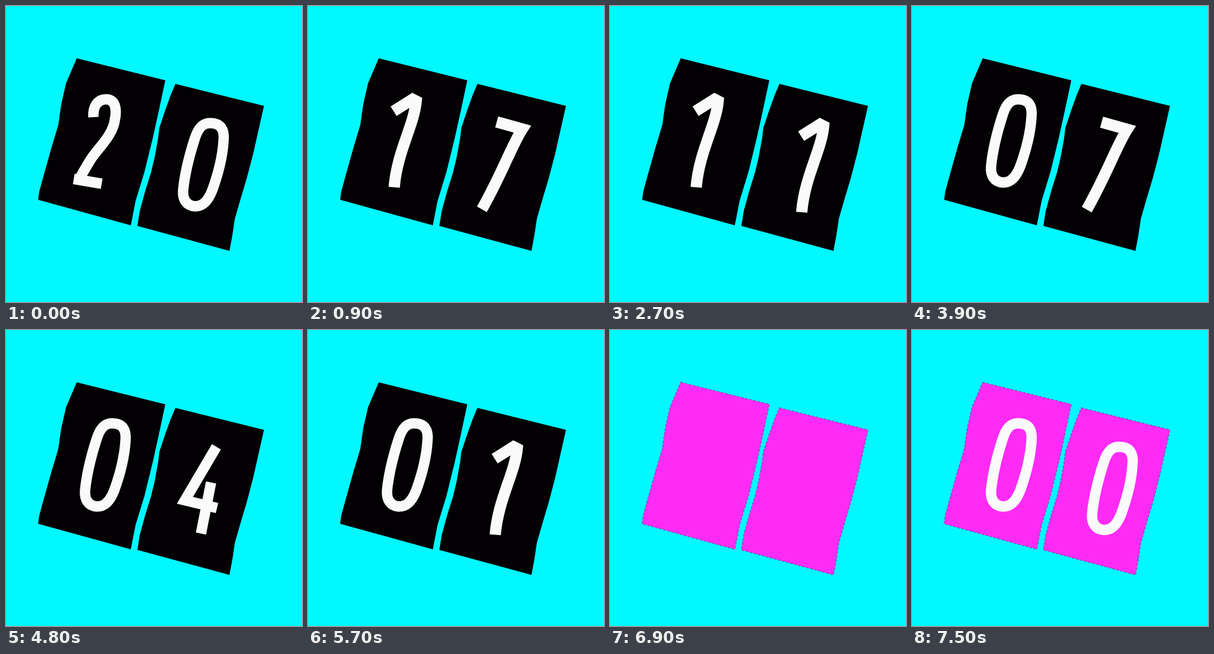
These frames come from a looping animation (498 px wide and 498 px high, 7800 ms). An HTML page with a canvas:

```html
<!DOCTYPE html>
<html lang="en">
<head>
<meta charset="utf-8">
<title>Countdown</title>
<style>
  html, body { margin: 0; width: 100%; height: 100%; overflow: hidden; background: #00f8ff; }
  canvas { display: block; }
</style>
</head>
<body>
<canvas id="stage" width="498" height="498"></canvas>
<script>
const ctx = document.getElementById('stage').getContext('2d');

const STEP = 300;
const LOOP = 7800;
const START = 20;
const BLANK_STEPS = [21, 23];

const CYAN = '#00f8ff';
const BLACK = '#030003';
const MAGENTA = '#ff2bf5';
const WHITE = '#fafafa';

const panels = [
  'M119 88 L268 125 L258 172 L247 222 L233 279 L218 328 L210 369 L54 326 L56 312 L62 290 L76 240 L88 200 L93 165 L101 130 Z',
  'M285 131 L434 168 L416 248 L405 290 L396 320 L385 358 L381 385 L376 412 L221 370 L225 345 L234 312 L244 280 L250 255 L256 222 L258 205 L268 175 L277 150 Z'
].map(d => new Path2D(d));

// Centre lines of the slanted brush digits, placed on the left panel.
const digits = [
  'M178 157 C196 157 203 167 201 187 C199 218 190 248 182 270 C174 290 165 297 153 297 C138 296 132 285 133 270 C136 240 144 210 152 185 C158 165 166 157 178 157 Z',
  'M144 177 L176 157 L182 160 C178 202 150 245 145 305',
  'M147 187 C146 170 153 157 169 157 C184 157 187 174 183 192 C180 218 152 242 142 259 C134 272 127 284 122 294 M114 291 L161 299',
  'M150 178 C152 161 162 155 176 157 C195 159 198 178 193 195 C188 213 177 221 162 221 C182 224 188 238 184 258 C178 284 168 298 151 297 C134 295 130 281 133 263',
  'M184 157 L131 247 L185 260 M175 217 L158 303',
  'M199 166 L160 157 L148 217 C165 203 190 208 185 243 C180 280 168 298 150 297 C133 295 130 282 132 268',
  'M197 184 C198 165 190 156 177 157 C160 158 153 178 147 200 C139 230 133 250 132 270 C132 288 140 297 153 297 C170 297 178 278 183 256 C188 232 184 219 170 218 C156 217 145 228 140 240',
  'M149 156 L192 168 C175 194 158 243 124 303',
  'M166 222 C150 219 146 204 151 185 C156 165 164 157 177 157 C194 158 199 170 196 186 C192 208 184 223 166 222 C184 225 187 240 183 258 C178 284 168 297 153 297 C137 296 131 284 134 265 C139 240 148 223 166 222 Z',
  'M137 270 C136 289 144 298 157 297 C174 296 181 276 187 254 C195 224 201 204 202 184 C202 166 194 157 181 157 C164 157 156 176 151 198 C146 222 150 235 164 236 C178 237 189 226 194 214'
].map(d => new Path2D(d));

// Spacing of the right digit depends on its neighbour.
function rightOffset(tens, ones) {
  if (tens === 2) return [165, 40];
  if (tens === 1) return ones === 1 ? [177.5, 42] : [168.5, 39];
  return [170, 39.5];
}

function drawPanel(path, color) {
  ctx.fillStyle = color;
  ctx.fill(path);
  if (color === MAGENTA) {
    ctx.lineWidth = 1.5;
    ctx.strokeStyle = '#8054a8';
    ctx.setLineDash([4, 3]);
    ctx.stroke(path);
    ctx.setLineDash([]);
  }
}

function drawDigit(value, x, y) {
  ctx.save();
  ctx.translate(x, y);
  ctx.lineWidth = value === 1 || value === 7 ? 19 : 17.5;
  ctx.strokeStyle = WHITE;
  ctx.stroke(digits[value]);
  ctx.restore();
}

function render(time) {
  const step = Math.floor((time % LOOP) / STEP);
  const count = Math.max(0, START - step);
  const color = count ? BLACK : MAGENTA;

  ctx.fillStyle = CYAN;
  ctx.fillRect(0, 0, 498, 498);
  panels.forEach(panel => drawPanel(panel, color));

  if (!BLANK_STEPS.includes(step)) {
    const tens = Math.floor(count / 10);
    const ones = count % 10;
    drawDigit(tens, 0, 0);
    drawDigit(ones, ...rightOffset(tens, ones));
  }
}

const begin = performance.now();
function tick() {
  render(performance.now() - begin);
  requestAnimationFrame(tick);
}
tick();
</script>
</body>
</html>
```
